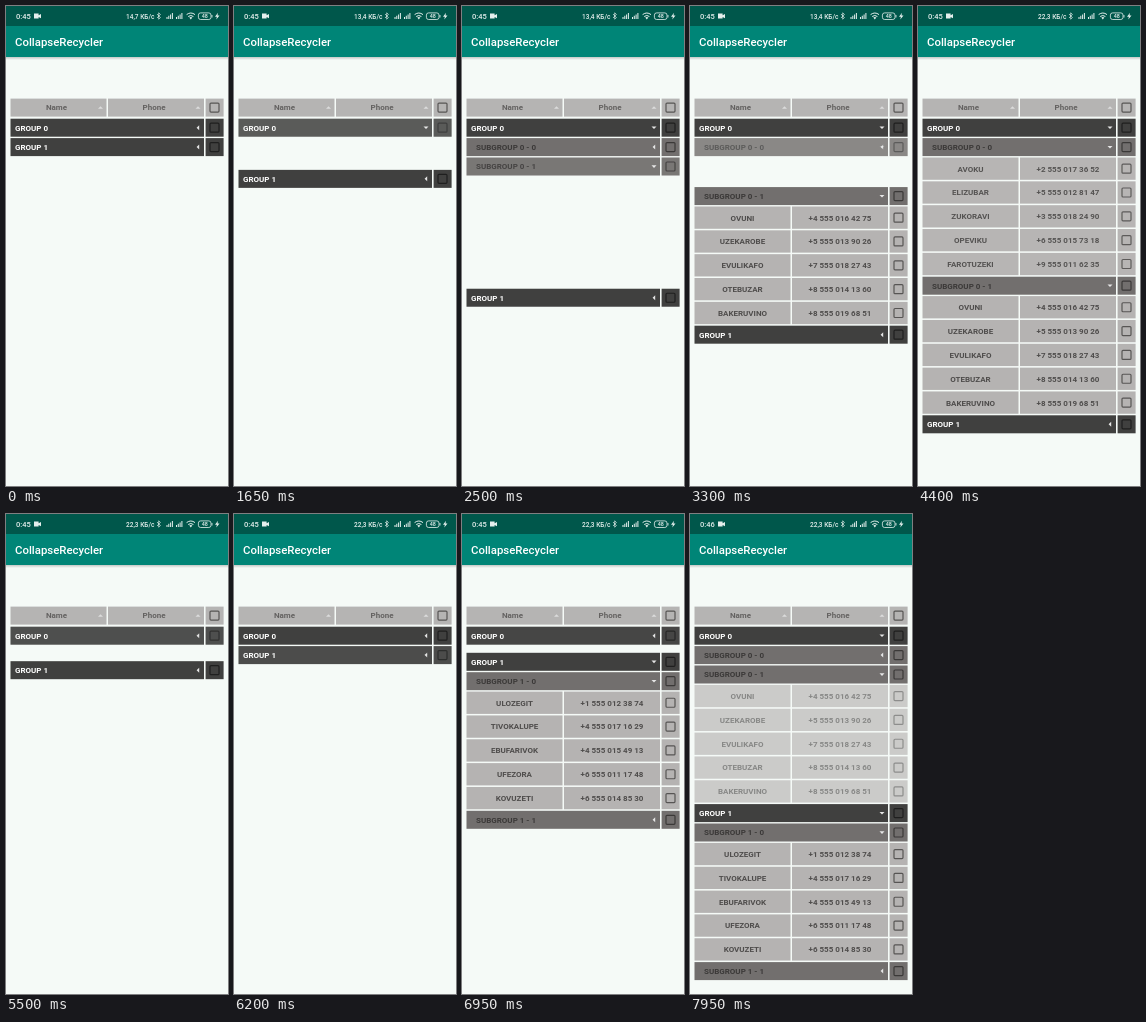
Recreate the animation shown at these times as an HTML page. Size 222 by 480 pixels, loop 8000 ms.

```html
<!DOCTYPE html>
<html lang="en">
<head>
<meta charset="utf-8">
<title>CollapseRecycler</title>
<style>
  html, body { margin: 0; width: 100%; height: 100%; overflow: hidden; background: #f5faf7; }
  svg { display: block; font: bold 8px Roboto, sans-serif; }
  .mid { text-anchor: middle; }
</style>
</head>
<body>
<svg width="222" height="480" viewBox="0 0 222 480">
  <defs>
    <linearGradient id="shadow" x2="0" y2="1">
      <stop offset="0" stop-opacity=".2"/>
      <stop offset="1" stop-opacity="0"/>
    </linearGradient>
  </defs>
  <rect width="222" height="480" fill="#f5faf7"/>
  <rect y="51" width="222" height="3" fill="url(#shadow)"/>
  <rect width="222" height="51" fill="#008577"/>
  <rect width="222" height="20" fill="#00574b"/>
  <text x="9" y="40.4" fill="#fff" font-size="11.4" font-weight="500">CollapseRecycler</text>

  <g fill="#e4efed" font-weight="500">
    <text id="clock" x="10" y="12.8" font-size="7.5"></text>
    <path d="M28 7.6h4.6v1.6l2.4-1.3v4.4l-2.4-1.3v1.6H28z"/>
    <text id="speed" x="120" y="12.5" font-size="6.5"></text>
    <path d="M151 8l3.4 3.6-1.7 1.6V6.8l1.7 1.6L151 12" fill="none" stroke="#e4efed" stroke-width=".7"/>
    <path id="bars" d="M160.5 11h1v2h-1zM162.3 9.8h1V13h-1zM164.1 8.4h1V13h-1zM165.9 7h1v6h-1z"/>
    <use href="#bars" x="9.5"/>
    <path d="M180.6 8.6q4.2-3.2 8.4 0M182.2 10.5q2.6-2 5.2 0" fill="none" stroke="#e4efed" stroke-width="1"/>
    <path d="M183.3 11.5q1.5-1 3 0l-1.5 1.9z"/>
    <rect x="192.4" y="6.9" width="12.6" height="6.6" rx="2.2" fill="none" stroke="#e4efed" stroke-width=".8"/>
    <path d="M205.6 9h.8v2.4h-.8z"/>
    <text class="mid" x="198.7" y="12.1" font-size="5.4">48</text>
    <path d="M212 6.8l-3 3.9h1.9l-.6 2.9 3.2-4h-2z"/>
  </g>

  <g id="header"></g>
  <g id="list"></g>
</svg>
<script>
const LOOP = 8000, STEP = 50;
const FADE = 120, MOVE = 250;
const TOP = 112.7;

const KINDS = {
  group: { fill: '#40403f', ink: '#fff', box: '#1f1f1f', indent: 9, height: 18, pitch: 19.4 },
  sub: { fill: '#726f6e', ink: '#3b3938', box: '#3b3938', indent: 14, height: 18, pitch: 19.4 },
  item: { fill: '#b5b3b2', ink: '#4f4d4c', box: '#575554', height: 22.3, pitch: 23.84 },
};

const PEOPLE = {
  '0 - 0': ['AVOKU +2 555 017 36 52', 'ELIZUBAR +5 555 012 81 47', 'ZUKORAVI +3 555 018 24 90',
            'OPEVIKU +6 555 015 73 18', 'FAROTUZEKI +9 555 011 62 35'],
  '0 - 1': ['OVUNI +4 555 016 42 75', 'UZEKAROBE +5 555 013 90 26', 'EVULIKAFO +7 555 018 27 43',
            'OTEBUZAR +8 555 014 13 60', 'BAKERUVINO +8 555 019 68 51'],
  '1 - 0': ['ULOZEGIT +1 555 012 38 74', 'TIVOKALUPE +4 555 017 16 29', 'EBUFARIVOK +4 555 015 49 13',
            'UFEZORA +6 555 011 17 48', 'KOVUZETI +6 555 014 85 30'],
  '1 - 1': [],
};

// Taps that toggle a row; the first one is a resting state.
const TAPS = [
  [-1000, ''], [1470, 'GROUP 0'], [2290, 'SUBGROUP 0 - 1'], [3217, 'SUBGROUP 0 - 0'],
  [4385, 'SUBGROUP 0 - 0'], [5180, 'GROUP 0'], [6155, 'GROUP 1'], [6917, 'GROUP 0'],
  [7902, 'SUBGROUP 0 - 1'],
];

const $ = id => document.getElementById(id);
const clamp = x => Math.min(1, Math.max(0, x));
const ease = x => (1 - Math.cos(Math.PI * clamp(x))) / 2;

const rect = (x, w, h, fill) => `<rect x="${x}" width="${w}" height="${h}" fill="${fill}"/>`;
const label = (x, h, ink, text, cls = '') =>
  `<text class="${cls}" x="${x}" y="${h / 2 + 2.9}" fill="${ink}">${text}</text>`;
const checkbox = (h, color) =>
  `<rect x="204" y="${h / 2 - 4.5}" width="9" height="9" rx="1" fill="none" stroke="${color}" stroke-width="1.2"/>`;
const arrow = (x, y, angle, color = '#e6e6e6') =>
  `<path d="M-2.5-1.2h5L0 1.4z" fill="${color}" transform="translate(${x} ${y}) rotate(${angle})"/>`;

function folderFace({ fill, ink, box, indent, height }, text, open) {
  return rect(4.5, 193.5, height, fill) + rect(199.6, 18, height, fill) +
    label(indent, height, ink, text) + arrow(192, height / 2, open ? 0 : 90) + checkbox(height, box);
}

function cellsFace({ fill, ink, box, height }, first, second, x1, x2) {
  return rect(4.5, 96, height, fill) + rect(102, 96, height, fill) + rect(199.6, 18, height, fill) +
    label(x1, height, ink, first, 'mid') + label(x2, height, ink, second, 'mid') + checkbox(height, box);
}

const rows = [];

function addRow(kind, text, parents) {
  const look = KINDS[kind];
  const el = document.createElementNS('http://www.w3.org/2000/svg', 'g');
  if (kind === 'item') {
    const cut = text.indexOf(' ');
    el.innerHTML = cellsFace(look, text.slice(0, cut), text.slice(cut + 1), 52.5, 150);
  } else {
    el.innerHTML = [false, true].map(open => `<g>${folderFace(look, text, open)}</g>`).join('');
  }
  $('list').append(el);
  rows.push({ el, kind, text, parents, pitch: look.pitch });
}

for (const g of [0, 1]) {
  const group = `GROUP ${g}`;
  addRow('group', group, []);
  for (const s of [0, 1]) {
    const key = `${g} - ${s}`, sub = `SUBGROUP ${key}`;
    addRow('sub', sub, [group]);
    PEOPLE[key].forEach(person => addRow('item', person, [group, sub]));
  }
}

const headerLook = { ...KINDS.item, fill: '#b5b4b3', ink: '#646261', height: 18 };
$('header').setAttribute('transform', 'translate(0 92.6)');
$('header').innerHTML = cellsFace(headerLook, 'Name', 'Phone', 50.5, 148) +
  arrow(94.5, 9, 180, '#dcdcdc') + arrow(192, 9, 180, '#dcdcdc');

// Row tops for a set of open folders; hidden rows get null.
function layout(open) {
  let y = TOP;
  const tops = rows.map(({ parents, pitch }) => {
    if (!parents.every(p => open.has(p))) return null;
    y += pitch;
    return y - pitch;
  });
  return { open, tops };
}

const states = [layout(new Set(['SUBGROUP 1 - 0']))];
for (const [, id] of TAPS) {
  const open = new Set(states.at(-1).open);
  if (id && !open.delete(id)) open.add(id);
  states.push(layout(open));
}

function draw(t) {
  const k = TAPS.findLastIndex(([at]) => at <= t);
  const [at, tapped] = TAPS[k];
  const from = states[k], to = states[k + 1];
  const age = t - at;
  // Removed rows fade first, then the rest moves, then added rows appear.
  const removed = ease(age / FADE);
  const moved = ease((age - (from.open.has(tapped) ? FADE : 0)) / MOVE);
  const added = ease((age - MOVE) / FADE);

  rows.forEach(({ el, kind, text }, i) => {
    const a = from.tops[i], b = to.tops[i];
    const alpha = a === null ? (b === null ? 0 : added) : b === null ? 1 - removed : 1;
    const y = a === null ? b : b === null ? a : a + (b - a) * moved;
    el.setAttribute('opacity', alpha);
    el.setAttribute('transform', `translate(0 ${y ?? 0})`);
    if (kind === 'item') return;
    const wasOpen = +from.open.has(text), isOpen = +to.open.has(text);
    const openness = wasOpen + (isOpen - wasOpen) * moved;
    el.children[0].setAttribute('opacity', 1 - openness);
    el.children[1].setAttribute('opacity', openness);
  });

  $('clock').textContent = t < 7100 ? '0:45' : '0:46';
  $('speed').textContent = (t < 400 ? '14,7' : t < 4400 ? '13,4' : '22,3') + ' КБ/с';
}

function tick() {
  const t = performance.now() % LOOP;
  draw(Math.floor(t / STEP) * STEP);
  requestAnimationFrame(tick);
}
tick();
</script>
</body>
</html>
```
